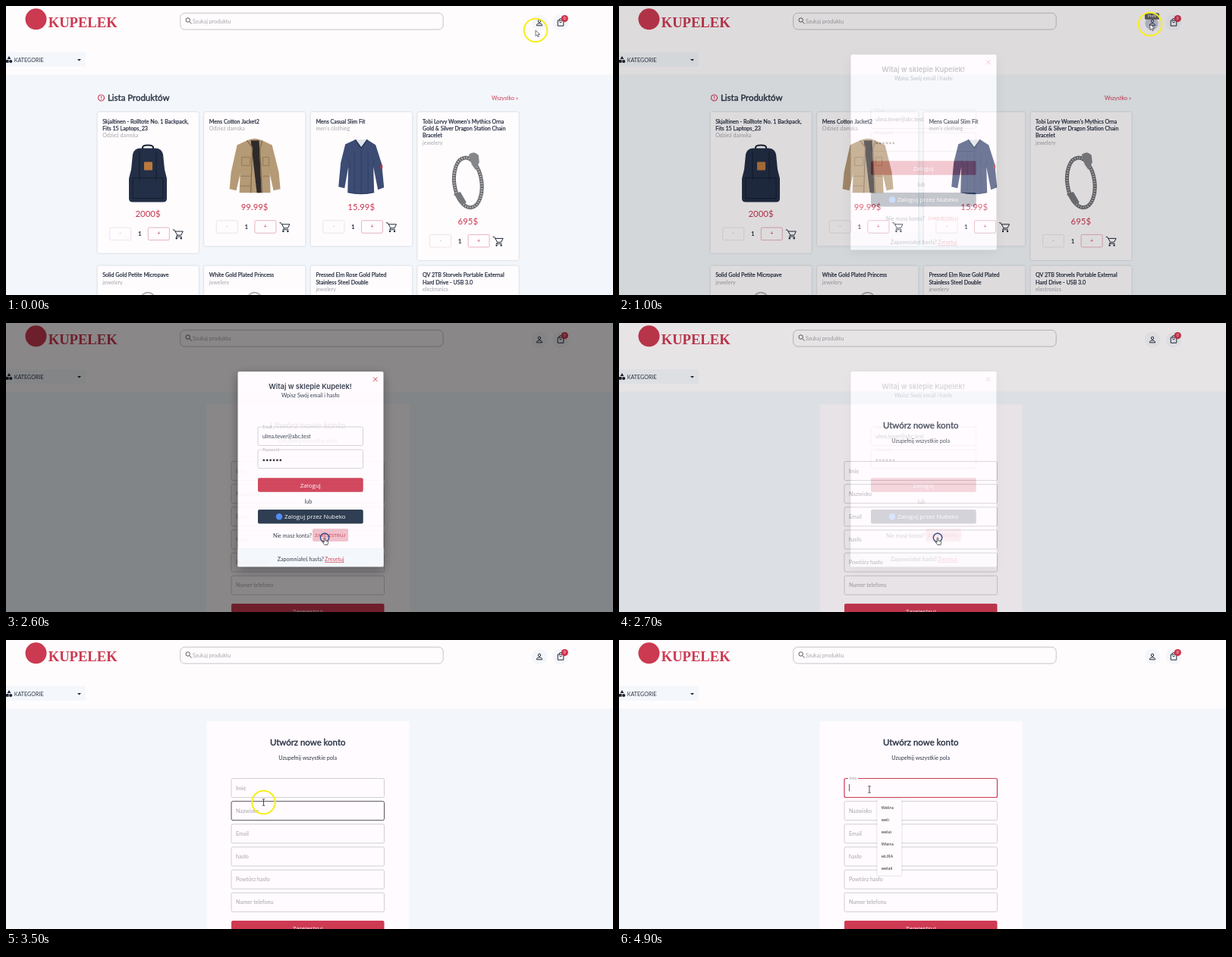
An HTML page for the animation above (5000 ms loop, 800x381 px).

```html
<!DOCTYPE html>
<html lang="pl">
<head>
<meta charset="utf-8">
<title>Sklep – rejestracja</title>
<style>
html, body { margin: 0; width: 100%; height: 100%; overflow: hidden; background: #fffcfe; }
svg { display: block; width: 100%; height: 100%; }
text { font: 7.15px Lato, sans-serif; fill: #2b3445; }
.strong { stroke: #2b3445; stroke-width: .25px; }
.title { font-size: 11.45px; stroke: #2b3445; stroke-width: .4px; }
.brand { font: bold 18.6px "Liberation Serif", serif; fill: #cb3a51; }
.welcome { font: 600 9.3px Inter, sans-serif; }
.grey { fill: #a6a6ab; }
.red { fill: #cf3a53; }
.price { font-size: 11.4px; fill: #c8344f; }
.button { font: 8px "Open Sans", sans-serif; fill: #fff; }
.small { font-size: 5.3px; fill: #a6a6ab; }
.tiny { font-size: 5px; fill: #fff; }
.option { font: 5.5px "Open Sans", sans-serif; fill: #222; }
.mid { text-anchor: middle; }
.line { fill: none; stroke: #1f2937; stroke-width: 1; }
.card { fill: #fffcfe; filter: drop-shadow(0 .7px .8px rgba(40, 50, 70, .25)); }
.dialog { fill: #fffbfe; filter: drop-shadow(0 4px 7px rgba(0, 0, 0, .4)); }
.field { fill: none; stroke: #c6c6ca; stroke-width: .8; }
.field.hover { stroke: #2b2b33; }
.field.focus { stroke: #cf3a53; stroke-width: 1.2; }
</style>
</head>
<body>
<svg id="stage" viewBox="0 0 800 381" preserveAspectRatio="none"></svg>
<script>
const LOOP = 5000, STEP = 100;
const RED = '#cf3a53';

const text = (x, y, content, cls = '') => `<text x="${x}" y="${y}" class="${cls}">${content}</text>`;
const rect = (x, y, w, h, attrs = '') => `<rect x="${x}" y="${y}" width="${w}" height="${h}" ${attrs}/>`;
const circle = (x, y, r, attrs = '') => `<circle cx="${x}" cy="${y}" r="${r}" ${attrs}/>`;
const path = (d, attrs = '') => `<path d="${d}" ${attrs}/>`;
const group = (attrs, ...parts) => `<g ${attrs}>${parts.join('')}</g>`;
const at = (x, y, ...parts) => group(`transform="translate(${x} ${y})"`, ...parts);

// Product pictures: centred on x = 0, 75 px tall.
const backpack = () =>
  path('M-7 8V3q0-3 7-3t7 3v5', 'fill="none" stroke="#1b2436" stroke-width="2"') +
  path('M-20 12q2-8 10-8h20q8 0 10 8l2 20 3 12v26q0 5-5 5h-40q-5 0-5-5V44l3-12z', 'fill="#232f47"') +
  path('M-20 43h40M-20 43v27h40V43M-11 8v38M11 8v38', 'fill="none" stroke="#141c2c" stroke-width="1"') +
  rect(-5, 22, 11, 11, 'rx="1" fill="#b9793c"');

const jacket = () =>
  path('M-10 3Q0-2 10 3l13 6 9 36 2 22-9 2-5-22 1 25H-20l1-25-5 22-9-2 2-22 8-36z', 'fill="#b59a76"') +
  path('M-5 3h11l3 69h-6z', 'fill="#2e2a2a"') +
  path('M-10 3l7 9-2 60M10 3l-3 12 3 57', 'fill="none" stroke="#806a4e" stroke-width="1.3"') +
  path('M-17 25h11v11h-11zM11 25h8v11h-8zM-19 50h14M11 50h9M-19 63h14', 'fill="none" stroke="#927a5a"');

const sweater = () =>
  path('M-8 2Q0 4 8 2l11 7 8 25 3 31-8 3-6-30 1 34q-17 4-35 0l1-34-5 28-8-2 3-32 6-24z', 'fill="#3d4c73"') +
  path('M-8 2L0 13 8 2', 'fill="#dfe3ec" stroke="#2a3655" stroke-width="1.6"') +
  path('M-17 28l3 12M17 28l-2 10M-17 71q17 4 34 0M-9 20v50M0 16v57M9 20v50', 'fill="none" stroke="#2f3c60" stroke-width=".8"') +
  rect(25, 35, 3, 5, 'fill="#a13b48"');

const bracelet = () =>
  group('transform="translate(0 40) rotate(-8)" fill="none"',
    '<ellipse rx="18" ry="33" stroke="#66676b" stroke-width="5"/>',
    '<ellipse rx="18" ry="33" stroke="#b9babd" stroke-width="3" stroke-dasharray="1.4 1.8"/>') +
  path('M1 3q7-6 13 1l1 9-5 10-5-7z', 'fill="#85868a"') +
  path('M-19 55l9-3 8 14-5 3z', 'fill="#77787c"');

const jewel = () => '<ellipse cy="7" rx="8" ry="6" fill="none" stroke="#b4b4b8" stroke-width="2"/>';

const cart = path('M0 1h2l4 7h5l2.5-5H3M6 8L4.5 10H12', 'class="line"') +
  circle(5, 12.2, 1.2, 'fill="#1f2937"') + circle(11, 12.2, 1.2, 'fill="#1f2937"');

function product(x, y, [titles, category, picture, price]) {
  const shift = 9.3 * (titles.length - 1);
  const quantity = at(0, 142.8 + shift,
    rect(16.2, 0, 28, 16.5, 'rx="1.5" fill="none" stroke="#e9dfe3" stroke-width=".8"'),
    rect(66.8, 0, 28, 16.5, 'rx="1.5" fill="none" stroke="#dfa3af" stroke-width=".8"'),
    text(30.2, 10.2, '-', 'mid grey'), text(80.8, 10.4, '+', 'mid red'),
    text(55.7, 11.2, '<tspan font-weight="bold" style="font-size:8px">1</tspan>', 'mid'),
    at(99.3, 2, cart));
  return at(x, y,
    rect(0, 0, 133.4, 176.5 + shift, 'rx="2" class="card"'),
    ...titles.map((line, i) => text(6.7, 14.7 + 9.3 * i, line, 'strong')),
    text(6.7, 24 + shift, category, 'grey'),
    at(66.5, 34.3 + shift, picture()),
    text(66.5, 129 + shift, price, 'price mid'), quantity);
}

const products = [
  [['Skjaltinen - Rolltote No. 1 Backpack,', 'Fits 15 Laptops_23'], 'Odzież damska', backpack, '2000$'],
  [['Mens Cotton Jacket2'], 'Odzież damska', jacket, '99.99$'],
  [['Mens Casual Slim Fit'], "men's clothing", sweater, '15.99$'],
  [["Tobi Lorvy Women's Mythics Orna", 'Gold &amp; Silver Dragon Station Chain', 'Bracelet'], 'jewelery', bracelet, '695$'],
  [['Solid Gold Petite Micropave'], 'jewelery', jewel, '168$'],
  [['White Gold Plated Princess'], 'jewelery', jewel, '9.99$'],
  [['Pressed Elm Rose Gold Plated', 'Stainless Steel Double'], 'jewelery', jewel, '10.99$'],
  [['QV 2TB Storvels Portable External', 'Hard Drive - USB 3.0'], 'electronics', jewel, '64$'],
];

const header =
  rect(0, 0, 800, 90.5, 'fill="#fffcfe"') +
  circle(39.5, 17.3, 14, 'fill="#cb3a51"') + text(55.7, 27.7, 'KUPELEK', 'brand') +
  rect(229.7, 9.3, 346.5, 21.7, 'rx="6" fill="none" stroke="#c4c4c9"') +
  circle(239.7, 18.5, 2.7, 'class="line" style="stroke:#555"') +
  path('M241.7 20.5l3 3', 'class="line" style="stroke:#555"') +
  text(246, 22.8, 'Szukaj produktu', 'grey') +
  circle(703, 22, 10.5, 'fill="#f5f6fa"') + circle(731, 22, 10.5, 'fill="#f5f6fa"') +
  circle(703, 19.9, 1.7, 'class="line"') + path('M699.4 25.8v-1.2q1-1.6 3.6-1.6t3.6 1.6v1.2z', 'class="line"') +
  path('M727.2 19h7.6v7.2h-7.6zM729 19q0-2.5 2-2.5t2 2.5M729.3 20.8q1.7 2.4 3.4 0', 'class="line"') +
  circle(736.3, 16.6, 4.6, 'fill="#d2344d"') + text(736.3, 18.4, '0', 'tiny mid') +
  rect(0, 61, 105, 19, 'fill="#f4f7fb"') +
  path('M4 66l2.4 4H1.6zM0 71h3.6v3.8H0z', 'fill="#1c2331"') + circle(6.2, 73, 2.1, 'fill="#1c2331"') +
  text(10.7, 73.5, 'KATEGORIE') + path('M94 70h5l-2.5 2.6z', 'fill="#1c2331"');

const shop = group('id="shop"',
  circle(125.5, 121, 4, `fill="none" stroke="${RED}" stroke-width="1.2" stroke-dasharray="2 .3"`),
  path('M125.5 118.5v3M125.5 122.4v1', `stroke="${RED}"`),
  text(134, 125, 'Lista Produktów', 'title'), text(640, 123.6, 'Wszystko »', 'red'),
  ...products.map((item, i) => product(120.5 + 140.6 * (i % 4), i < 4 ? 140 : 342.5, item)));

const FIELD_TOP = 182.5, FIELD_PITCH = 30.15, FIELD_HEIGHT = 25;
const labels = ['Imię', 'Nazwisko', 'Email', 'hasło', 'Powtórz hasło', 'Numer telefonu'];
const names = ['Welira', 'weli', 'welai', 'Wleira', 'wLIRA', 'welail'];

const register = group('id="register"',
  rect(264.5, 107, 267, 300, 'rx="2" fill="#fffbfe"'),
  text(397.7, 139.3, 'Utwórz nowe konto', 'title mid'),
  text(397.7, 157.7, 'Uzupełnij wszystkie pola', 'mid'),
  ...labels.map((label, i) => {
    const y = FIELD_TOP + FIELD_PITCH * i;
    return rect(297, y, 201.5, FIELD_HEIGHT, 'rx="2" class="field"') +
      text(303, y + 15.1, label, 'grey placeholder');
  }),
  rect(297, 370, 201.5, 18.5, `rx="2" fill="${RED}"`),
  text(397.7, 382.7, 'Zarejestruj', 'button mid'),
  group('id="focusLabel"', rect(302, 181, 13, 3, 'fill="#fffbfe"'), text(303.5, 184.4, 'Imię', 'small red')),
  rect(303.2, 190, .7, 9.5, 'id="caret" fill="#222"'),
  group('id="options"', rect(340.3, 209.5, 32, 101, 'class="card"'),
    ...names.map((name, i) => text(345.7, 223 + 16 * i, name, 'option'))));

const loginField = (y, label) =>
  rect(332, y, 138.5, 24.5, 'rx="2" class="field"') +
  rect(336.5, y - 1, label.length * 2.6 + 3, 2, 'fill="#fffbfe"') + text(338, y + 2, label, 'small');

const login = group('id="login"',
  rect(0, 0, 800, 381, 'opacity=".5"'),
  rect(305.5, 64, 192, 257.3, 'rx="2" class="dialog"'),
  rect(305.5, 297, 192, 24.3, 'fill="#f4f7fb"'),
  path('M484 71.5l5.5 5.5M489.5 71.5l-5.5 5.5', `stroke="${RED}"`),
  text(401, 87, 'Witaj w sklepie Kupelek!', 'welcome mid'),
  text(401.3, 98.3, 'Wpisz Swój email i hasło', 'mid'),
  loginField(137, 'Email'), loginField(167, 'Password'),
  text(338, 152.3, 'ulma.tever@abc.test'),
  ...Array.from({ length: 6 }, (_, i) => circle(339.8 + 4.4 * i, 180.8, 1.4, 'fill="#222"')),
  rect(332, 204.3, 138.7, 18.5, `rx="2" fill="${RED}"`), text(401.3, 216.6, 'Zaloguj', 'button mid'),
  text(398.5, 238, 'lub', 'mid'),
  rect(332, 246, 138.7, 18.5, 'rx="2" fill="#1f2f45"'),
  circle(360, 255.2, 4.2, 'fill="#4285f4"'), text(367, 258.2, 'Zaloguj przez Nubeko', 'button'),
  rect(404, 271.3, 47, 16.7, `id="linkHover" rx="2" fill="${RED}"`),
  text(352, 282.5, 'Nie masz konta?'),
  text(407, 281.8, '<tspan style="font-size:6.3px">ZAREJESTRUJ</tspan>', 'red'),
  text(357.7, 314.3, 'Zapomniałeś hasła?'),
  text(420, 314.3, '<tspan text-decoration="underline">Zresetuj</tspan>', 'red'));

const profileHover = group('id="profileHover"',
  circle(702, 23, 8.5, 'fill="#4a4d80" opacity=".28"'),
  rect(693, 9.3, 19, 8.5, 'rx="1.5" fill="#616161"'), text(702.5, 15.3, 'Profil', 'tiny mid'));

const pointer = group('id="pointer"',
  circle(0, 0, 15.3, 'id="halo" fill="none" stroke="#f7ee1e" stroke-width="2"'),
  circle(0, 0, 5.7, 'id="press" fill="none" stroke="#2f4a8c" stroke-width="1.4"'),
  path('M0 0v7.6l1.8-1.7 1.3 2.9 1.3-.6-1.3-2.8h2.5z', 'id="arrow" fill="#fff" stroke="#222" stroke-width=".6"'),
  path('M-.8.5q.8-1 1.6 0v3.4l3 .8q1 .3.8 1.5l-.7 3.3H0L-3 5.8q.3-1.4 2.2.3z', 'id="hand" fill="#fff" stroke="#222" stroke-width=".7"'),
  path('M-1.7-4.3H-.4L0-4l.4-.3h1.3M0-4v8M-1.7 4.3H-.4L0 4l.4.3h1.3', 'id="beam" fill="none" stroke="#222" stroke-width=".8"'));

const stage = document.getElementById('stage');
stage.innerHTML = rect(0, 0, 800, 381, 'fill="#f3f7fb"') + header + shop + register + profileHover + login + pointer;

const $ = id => document.getElementById(id);
const show = (id, visible) => { $(id).style.display = visible ? '' : 'none'; };
const between = (t, from, to) => t >= from && t < to;
const ease = (t, start, length) => {
  const p = Math.min(1, Math.max(0, (t - start) / length));
  return p * p * (3 - 2 * p);
};

// Pointer route as [time, x, y].
const route = [
  [0, 698, 32], [300, 690, 22], [400, 695, 18], [600, 700, 24], [1000, 700, 24], [1200, 692, 31],
  [1700, 428, 273], [1800, 430, 280], [2000, 424, 298], [2400, 420, 283], [2800, 420, 283],
  [3000, 421, 285], [3300, 372, 150], [3500, 339.5, 214], [3600, 334, 199], [4000, 340, 200],
  [4100, 340, 200], [4400, 344, 197], [4500, 344, 197], [4600, 324, 199], [4700, 324, 199],
  [4800, 350, 199], [4900, 330, 197], [LOOP, 330, 197],
];

function pointerAt(t) {
  const i = route.findIndex(stop => stop[0] > t);
  const [t0, x0, y0] = route[i - 1], [t1, x1, y1] = route[i];
  const p = ease(t, t0, t1 - t0);
  return [x0 + (x1 - x0) * p, y0 + (y1 - y0) * p];
}

const fields = [...document.querySelectorAll('#register .field')];
const firstPlaceholder = document.querySelector('.placeholder');

function draw(t) {
  const [x, y] = pointerAt(t);
  const onForm = t >= 2600, focused = t >= 3700;
  show('shop', !onForm);
  show('register', onForm);

  const dialog = ease(t, 920, 240) * (1 - ease(t, 2570, 180));
  show('login', dialog > 0);
  $('login').setAttribute('opacity', dialog);
  $('linkHover').setAttribute('opacity', t >= 2500 ? .32 : t >= 1700 ? .05 : 0);
  show('profileHover', between(t, 500, 1100));

  fields.forEach((field, i) => {
    const offset = y - FIELD_TOP - FIELD_PITCH * i;
    field.classList.toggle('hover', t >= 2800 && offset >= 0 && offset <= FIELD_HEIGHT);
    field.classList.toggle('focus', focused && i === 0);
  });
  firstPlaceholder.style.display = focused ? 'none' : '';
  show('focusLabel', focused);
  show('caret', focused && !between(t, 4250, 4750));
  show('options', t >= 3900);

  const pressed = between(t, 700, 1000) || between(t, 2500, 2800);
  const hand = between(t, 500, 1000) || between(t, 1700, 2800);
  const beam = t >= 2800 && y > FIELD_TOP;
  $('pointer').setAttribute('transform', `translate(${x} ${y})`);
  show('press', pressed);
  show('halo', !pressed && !focused);
  show('hand', hand);
  show('beam', beam);
  show('arrow', !hand && !beam);
}

const start = performance.now();
function frame() {
  const t = (performance.now() - start) % LOOP;
  draw(Math.floor(t / STEP) * STEP);
  requestAnimationFrame(frame);
}
frame();
</script>
</body>
</html>
```
